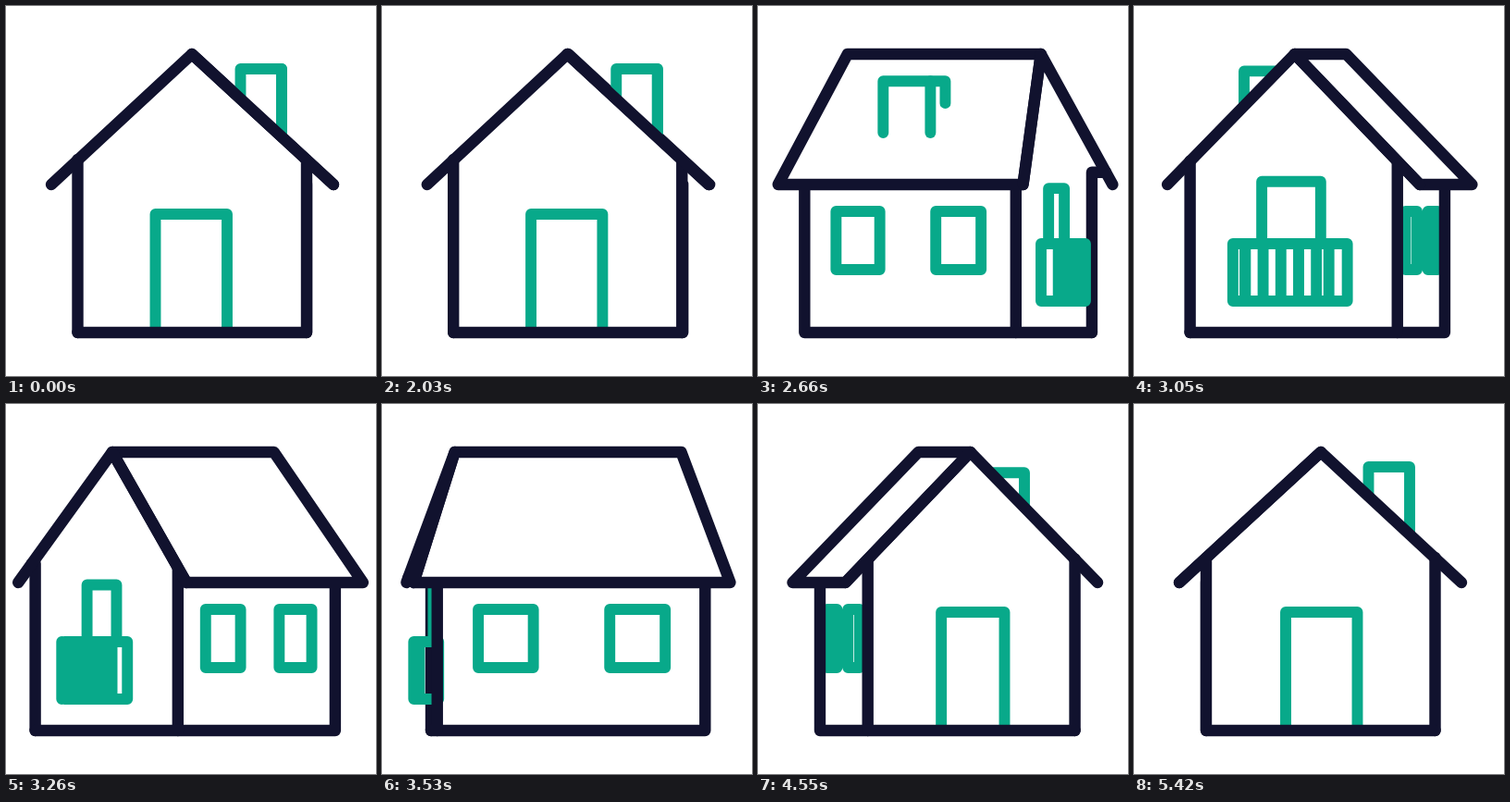
Animation of 400 by 400 pixels, one loop 5.45 s. Source, as an HTML page:

```html
<!DOCTYPE html>
<html lang="en">
<head>
<meta charset="utf-8">
<title>Turning house</title>
<style>
  html, body { margin: 0; width: 100%; height: 100%; overflow: hidden; background: #fff; }
  svg { display: block; width: 100vw; height: 100vh; }
  path { stroke-linecap: round; stroke-linejoin: round; fill: none; }
  .navy { stroke: #11122e; stroke-width: 12.4; }
  .green { stroke: #08a98a; stroke-width: 11.9; }
  .fill { fill: #fff; }
  .flat { stroke: none; }
  .butt { stroke-linecap: butt; }
</style>
</head>
<body>
<svg viewBox="0 0 400 400"><g id="house"></g></svg>
<script>
const LOOP = 5450, START = 2000, TURN = 3420, STEP = 30;
const RIDGE = 52, EAVE = 193, FLOOR = 353;
const house = document.getElementById('house');

const layers = {};
[['hiddenChimney', 'green'], ['side', 'fill flat'], ['windows', 'green'], ['sideWall', 'navy'],
 ['gable', 'fill flat'], ['farWall', 'navy'], ['door', 'green butt'], ['balcony', 'green'],
 ['base', 'navy'], ['roof', 'navy fill'], ['chimney', 'green fill'],
 ['chimneyEdge', 'green'], ['slopes', 'navy']].forEach(([name, style]) => {
  const path = document.createElementNS('http://www.w3.org/2000/svg', 'path');
  path.setAttribute('class', style);
  layers[name] = house.appendChild(path);
});

const draw = (name, d = '') => layers[name].setAttribute('d', d);
const line = (...points) => 'M' + points.map(p => p.map(n => n.toFixed(2)).join()).join('L');
const box = (x0, y0, x1, y1) => line([x0, y0], [x1, y0], [x1, y1], [x0, y1]) + 'Z';
const mix = (a, b, k) => a + (b - a) * k;

// Cubic timing curve with flat ends.
function ease(x) {
  let lo = 0, hi = 1;
  for (let i = 0; i < 30; i++) {
    const s = (lo + hi) / 2, r = 1 - s;
    if (3 * s * r * r * 0.185 + 3 * s * s * r * 0.2385 + s ** 3 < x) lo = s; else hi = s;
  }
  return x >= 1 ? 1 : x <= 0 ? 0 : lo * lo * (3 - 2 * lo);
}

// All poses have the gable on the right: key 0 faces the gable, 1 is a corner view, 2 faces the side.
function drawHouse(turn) {
  const quarter = Math.min(3, Math.floor(turn / 2));
  const part = turn - quarter * 2;
  const gableLeft = quarter % 2 === 0;
  const key = gableLeft ? part : 2 - part;
  const isFront = quarter === 0 || quarter === 3;
  const pose = (a, b, c) => key < 1 ? mix(a, b, key) : mix(b, c, key - 1);

  house.setAttribute('transform', gableLeft ? 'translate(403 0) scale(-1 1)' : '');

  const sideX = pose(78, 46, 54), cornerX = pose(78, 196, 349), farX = pose(325.5, 375, 349);
  const ridgeFar = pose(202, 119, 78), apexX = pose(202, 282, 326);
  const eaveFar = pose(49, 15.5, 27), eaveNear = pose(49, 181, 376), eaveRight = pose(354, 392, 376);
  const apex = [apexX, RIDGE], nearTip = [eaveNear, EAVE], rightTip = [eaveRight, EAVE];

  const along = Math.max(0, Math.min(1, (cornerX - apexX) / (eaveNear - apexX)));
  const cornerTop = [cornerX, mix(RIDGE, EAVE, along)];
  const farY = pose(166, 170, 188);
  const farTop = [farX, farY];
  const underRoof = [mix(apexX, eaveRight, (farY - RIDGE) / (EAVE - RIDGE)), farY];

  draw('side', box(sideX, EAVE, cornerX, FLOOR));
  const fromCorner = f => mix(cornerX, sideX, f);
  draw('windows',
    box(fromCorner(pose(0.165, 0.18, 0.152)), 222, fromCorner(pose(0.42, 0.405, 0.357)), 285) +
    box(fromCorner(0.644), 222, fromCorner(0.851), 285));
  draw('sideWall', line([sideX, EAVE], [sideX, FLOOR], [cornerX, FLOOR]));

  draw('gable', line([cornerX, FLOOR], cornerTop, apex, underRoof, farTop, [farX, FLOOR]) + 'Z');
  draw('farWall', line(underRoof, farTop, [farX, FLOOR]));
  drawDoor(pose, isFront);
  draw('balcony', isFront ? '' : balcony(pose));
  draw('base', line(cornerTop, [cornerX, FLOOR], [farX, FLOOR]));

  draw('roof', line([ridgeFar, RIDGE], apex, nearTip, [eaveFar, EAVE]) + 'Z');
  drawChimney(pose, quarter);
  draw('slopes', line(nearTip, apex, rightTip));
}

function drawDoor(pose, isFront) {
  const left = pose(164, isFront ? 263 : 273, 349), right = pose(241.5, isFront ? 314 : 310, 349);
  const top = isFront ? 225 : pose(187, 195, 199), bottom = isFront ? 348 : 257;
  draw('door', line([left, bottom], [left, top], [right, top], [right, bottom]));
}

function balcony(pose) {
  const top = 257, bottom = 319;
  const wallNear = pose(127, 260, 345), wallFar = pose(254, 339, 366);
  const railNear = pose(149, 276, 366), railFar = pose(276, 335, 370);
  const post = x => line([x, top], [x, bottom]);
  let d = box(wallNear, top, railFar, bottom) + post(wallFar) + post(railNear);
  for (let i = 0; i < 5; i++) d += post(mix(railNear, railFar, 0.13 + 0.185 * i));
  return d;
}

function drawChimney(pose, quarter) {
  if (quarter > 1) {
    const outer = pose(298, quarter === 2 ? 257 : 269, 250);
    const inner = pose(253.5, 240, 235);
    const top = pose(68, quarter === 2 ? 75 : 86, 90);
    draw('chimney');
    draw('chimneyEdge');
    draw('hiddenChimney', line([inner, 100], [inner, top], [outer, top], [outer, 139]));
    return;
  }
  const shift = quarter === 0 ? 40 : 0;
  const far = pose(105, 118, 150 + shift);
  const edge = pose(105, 155, 213 + shift);
  const inner = pose(149.5, 190, 213 + shift);
  const top = pose(68, 72, 89), innerY = pose(100, 103, 107);
  draw('hiddenChimney');
  draw('chimney', line([far, 137], [far, top], [inner, top], [inner, innerY]));
  draw('chimneyEdge', line([edge, top], [edge, 137]));
}

function frame(now) {
  const elapsed = Math.max(0, now % LOOP - START);
  const stepped = Math.floor(elapsed / STEP) * STEP;
  drawHouse(8 * ease(stepped / TURN));
  requestAnimationFrame(frame);
}
drawHouse(0);
requestAnimationFrame(frame);
</script>
</body>
</html>
```
